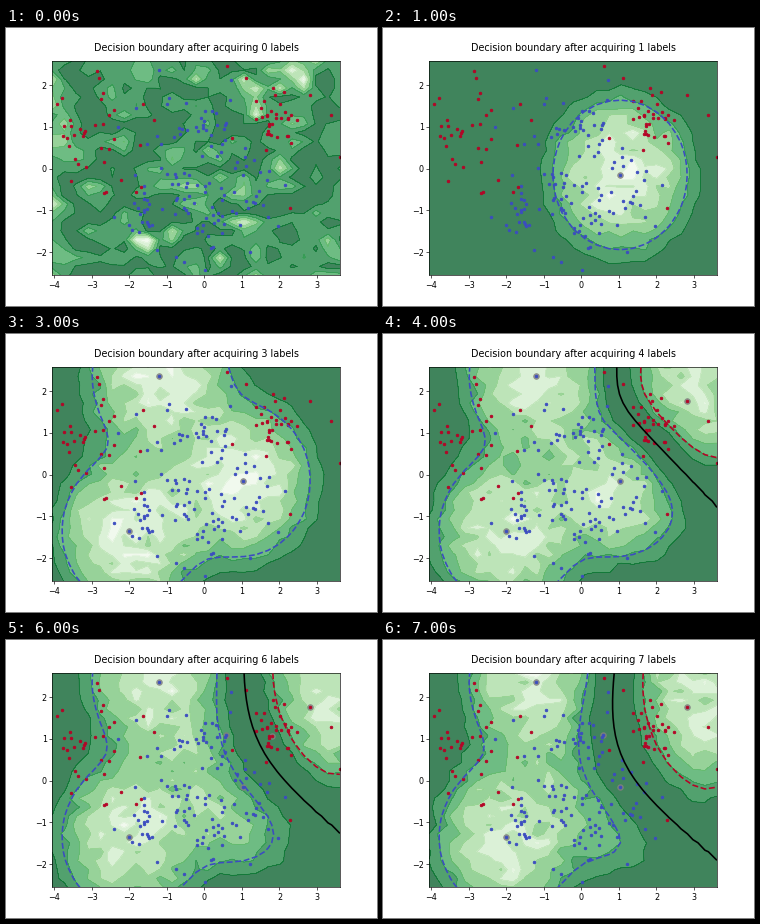
Animation of 371 by 278 pixels, one loop 8000 ms. Source, as a matplotlib script:

```python
import numpy as np
import matplotlib.pyplot as plt
from matplotlib.animation import FuncAnimation

W, H, DPI = 371, 278, 58
X0, X1, Y0, Y1 = -4.05, 3.61, -2.56, 2.57
RES = 25
BLUE, RED = (59 / 255, 76 / 255, 192 / 255), (180 / 255, 4 / 255, 38 / 255)

# Acquired samples in order; the flag marks the red class
acquired = np.array([(1.03, -.15), (-2.0, -1.35), (-1.2, 2.37), (2.82, 1.76),
                     (1.79, 1.08), (.58, 1.1), (1.78, .81)])
is_red = np.array([0, 0, 0, 1, 1, 0, 1], bool)

# Clusters: centre x, y, spread x, y, number of dots
red_groups = [(-3.2, 1.15, .45, .6, 28), (-2.3, .1, .55, .35, 6),
              (1.95, 1.1, .42, .38, 31)]
blue_groups = [(-.02, 1.1, .4, .25, 20), (-1.2, .55, .35, .4, 8),
               (-1.65, -1.05, .35, .25, 22), (-.4, -.5, .25, .32, 20),
               (.2, -1.3, .45, .25, 16), (1.1, -.75, .45, .5, 24),
               (.8, .5, .4, .3, 8)]

# Outlying dots
red_key = [(.6, 2.46), (1.1, 2.17), (3.38, 1.28), (3.61, .28), (2.28, -.94),
           (-1.63, 1.55), (-1.33, 1.16), (-2.68, -.58), (-1.68, -.44)]
blue_key = [(.71, 2.12), (-1, 1.55), (-1.82, 1.45), (-1.26, -1.95),
            (-.76, -2.12), (-.55, -2.24), (.01, -2.43), (2.15, -.39)]


def scatter_group(groups, key, known, seed):
    g = np.random.RandomState(seed)
    parts = [g.normal((cx, cy), (sx, sy), (n, 2)) for cx, cy, sx, sy, n in groups]
    return np.vstack(parts + [key, known])


red_dots = scatter_group(red_groups, red_key, acquired[is_red], 3)
blue_dots = scatter_group(blue_groups, blue_key, acquired[~is_red], 8)

xs, ys = np.linspace(X0, X1, RES), np.linspace(Y0, Y1, RES)
gx, gy = np.meshgrid(xs, ys)


def kernel_sum(points):
    total = np.zeros_like(gx)
    for px, py in points:
        total += np.exp(-.5 * ((gx - px) ** 2 + (gy - py) ** 2))
    return total


def initial_noise():
    """Skewed noise: mostly low, with a few isolated peaks."""
    z = np.random.RandomState(11).normal(size=gx.shape)
    z += .2 * sum(np.roll(z, step, axis) for step in (-1, 1) for axis in (0, 1))
    field = np.exp(.68 * z / z.std())
    return field / field.max()


def utility(blue, red, seed):
    """Squared margin of the class frequencies with sampling noise."""
    margin = ((blue - red) / (blue + red + .2)) ** 2
    noise = np.random.RandomState(seed).normal(0, .13, gx.shape)
    field = margin * np.clip(1 + noise, .5, 1.35)
    return field / field.max()


fig = plt.figure(figsize=(W / DPI, H / DPI), dpi=DPI)
ax = fig.add_subplot()


def draw(n):
    ax.clear()
    known, flags = acquired[:n], is_red[:n]
    blue, red = kernel_sum(known[~flags]), kernel_sum(known[flags])
    field = utility(blue, red, 20 + n) if n else initial_noise()
    bands = ax.contourf(xs, ys, field, cmap="Greens_r", alpha=.75)
    ax.contour(xs, ys, field, bands.levels, cmap="Greens_r", linewidths=.6,
               zorder=1.2)
    if n:
        ax.scatter(*known.T, c="grey", alpha=.8, marker=".", s=200, zorder=1.5)
        p_red = (red + .1) / (blue + red + .2)
        for level, color, style in ((.25, BLUE, "--"), (.5, "k", "-"),
                                    (.75, RED, "--")):
            if p_red.min() < level < p_red.max():
                ax.contour(xs, ys, p_red, [level], colors=[color],
                           linestyles=style, linewidths=2, zorder=3)
    for dots, color in ((blue_dots, BLUE), (red_dots, RED)):
        ax.scatter(*dots.T, color=[color], marker=".", s=42, zorder=2)
    ax.set(xlim=(X0, X1), ylim=(Y0, Y1))
    ax.set_title(f"Decision boundary after acquiring {n} labels", pad=12.26)
    return []


anim = FuncAnimation(fig, draw, frames=8, init_func=lambda: [], interval=1000,
                     repeat=True, repeat_delay=0, blit=False)
plt.show()
```
